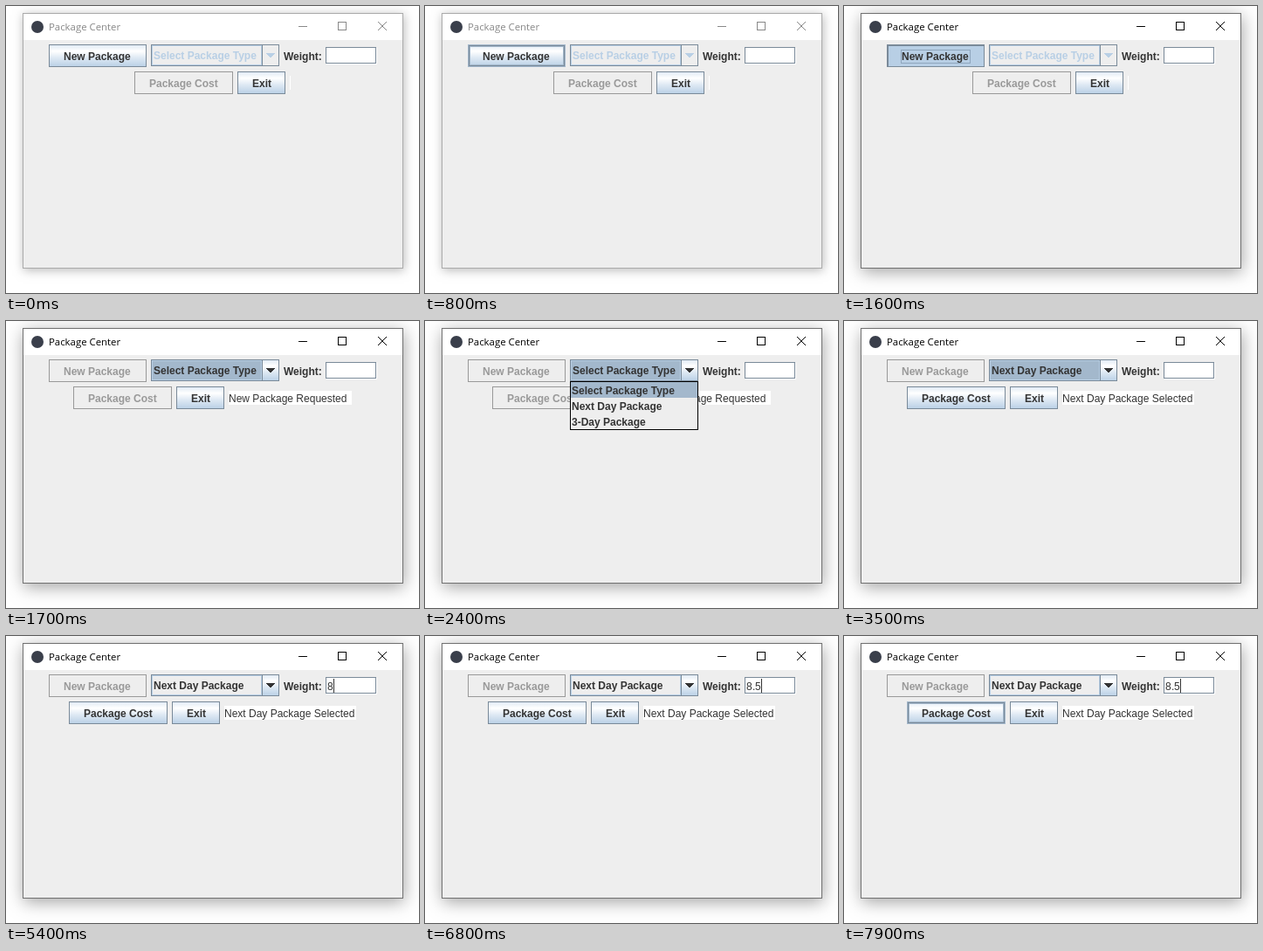
Write an HTML page with a canvas that moves like this. It is 473 by 329 pixels and loops after 8 s.

```html
<!DOCTYPE html>
<html lang="en">
<head>
<meta charset="utf-8">
<title>Package Center</title>
<style>
html, body { margin: 0; width: 100%; height: 100%; overflow: hidden; background: #fff; }
canvas { display: block; }
</style>
</head>
<body>
<canvas id="stage" width="473" height="329"></canvas>
<script>
const ctx = document.getElementById('stage').getContext('2d');
const LOOP = 8000;
const BOLD = 'bold 12px "Liberation Sans", Arial, sans-serif';
const PLAIN = '12px "Liberation Sans", Arial, sans-serif';
const TITLE = '11.4px "Open Sans", "Noto Sans", sans-serif';
const INK = '#333', FACE = '#eee', EDGE = '#7a8a99', SOFT = '#b8cfe5',
      SELECT = '#a3b8cc', DISABLED = '#999';
const TYPES = ['Select Package Type', 'Next Day Package', '3-Day Package'];

// Each step changes only the listed properties.
const STEPS = [
  [0, { active: false, create: 'normal', cost: 'disabled', combo: 'disabled', type: 0,
        popup: -1, rowX: 147, message: '', messageWidth: 1, weight: '', caretX: 0 }],
  [800, { create: 'hover' }],
  [1600, { active: true, create: 'pressed' }],
  [1700, { create: 'disabled', combo: 'focused', rowX: 77,
           message: 'New Package Requested', messageWidth: 141 }],
  [2400, { popup: 0 }],
  [3100, { popup: 1 }],
  [3500, { popup: -1, type: 1, cost: 'normal', rowX: 72,
           message: 'Next Day Package Selected', messageWidth: 151 }],
  [4000, { combo: 'normal', caretX: 368 }],
  [4400, { caretX: 0 }],
  [4900, { caretX: 368 }],
  [5400, { weight: '8', caretX: 375 }],
  [5800, { caretX: 0 }],
  [6300, { caretX: 375 }],
  [6400, { weight: '8.', caretX: 378 }],
  [6800, { weight: '8.5', caretX: 385 }],
  [7300, { caretX: 0 }],
  [7700, { caretX: 385 }],
  [7900, { cost: 'hover' }]
];

function stateAt(time) {
  return Object.assign({}, ...STEPS.filter(([start]) => start <= time).map(step => step[1]));
}

function fill(x, y, w, h, color) {
  ctx.fillStyle = color;
  ctx.fillRect(x, y, w, h);
}

function frame(x, y, w, h, color) {
  ctx.strokeStyle = color;
  ctx.lineWidth = 1;
  ctx.strokeRect(x + 0.5, y + 0.5, w - 1, h - 1);
}

function text(str, x, y, color = INK, font = BOLD) {
  ctx.font = font;
  ctx.fillStyle = color;
  ctx.fillText(str, x, y);
}

function gloss(x, y, w, h) {
  const g = ctx.createLinearGradient(0, y, 0, y + h);
  g.addColorStop(0, '#dde8f3');
  g.addColorStop(0.3, '#fff');
  g.addColorStop(0.6, '#dde8f3');
  g.addColorStop(1, SOFT);
  fill(x, y, w, h, g);
}

function drawWindow(active) {
  fill(0, 0, 473, 329, '#fff');
  ctx.save();
  ctx.shadowColor = active ? 'rgba(0,0,0,.36)' : 'rgba(0,0,0,.28)';
  ctx.shadowBlur = active ? 18 : 11;
  ctx.shadowOffsetX = 1;
  ctx.shadowOffsetY = active ? 4 : 2;
  fill(19, 8, 436, 293, '#fff');
  ctx.restore();
  fill(20, 39, 434, 261, FACE);
  frame(19, 8, 436, 293, active ? '#707070' : '#aaa');

  ctx.fillStyle = '#3a3f4b';
  ctx.beginPath();
  ctx.arc(36, 24, 7, 0, Math.PI * 2);
  ctx.fill();

  const color = active ? '#000' : '#888';
  text('Package Center', 49, 28, color, TITLE);
  fill(335, 23, 10, 1, color);
  frame(380, 18, 10, 10, color);
  ctx.strokeStyle = color;
  ctx.beginPath();
  ctx.moveTo(426, 18);
  ctx.lineTo(436, 28);
  ctx.moveTo(436, 18);
  ctx.lineTo(426, 28);
  ctx.stroke();
}

function drawButton(label, x, y, w, mode) {
  const h = 26;
  if (mode === 'disabled') {
    frame(x, y, w, h, DISABLED);
  } else if (mode === 'pressed') {
    fill(x, y, w, h, SOFT);
    frame(x, y, w, h, EDGE);
    fill(x, y, w, 2, EDGE);
    fill(x, y, 2, h, EDGE);
    frame(x + 16, y + 6, w - 32, 16, '#8fa6bd');
  } else {
    gloss(x, y, w, h);
    frame(x, y, w, h, EDGE);
    if (mode === 'hover') {
      frame(x, y, w, h, SELECT);
      frame(x + 1, y + 1, w - 2, h - 2, EDGE);
      frame(x + 2, y + 2, w - 4, h - 4, SELECT);
    }
  }
  text(label, x + 17, y + 18, mode === 'disabled' ? DISABLED : INK);
}

function drawCombo(label, mode) {
  const off = mode === 'disabled';
  fill(166, 44, 147, 25, FACE);
  if (!off) gloss(293, 44, 20, 25);
  frame(167, 45, 126, 23, SOFT);
  if (mode === 'focused') fill(168, 46, 124, 21, SELECT);
  frame(166, 44, 147, 25, EDGE);
  fill(293, 44, 1, 25, EDGE);
  for (let i = 0; i < 5; i++) fill(298 + i, 54 + i, 10 - 2 * i, 1, off ? SOFT : INK);
  text(label, 169, 61, off ? SOFT : INK);
}

function drawPopup(selected) {
  fill(166, 69, 147, 56, FACE);
  frame(166, 69, 147, 56, '#000');
  TYPES.forEach((label, i) => {
    const y = 70 + 18 * i;
    if (i === selected) fill(167, y, 145, 18, SELECT);
    text(label, 168, y + 14);
  });
}

function drawWeight(value, caretX) {
  text('Weight:', 318, 62);
  fill(367, 48, 58, 19, '#fff');
  frame(366, 47, 58, 19, EDGE);
  const advances = [0, 7, 10];
  [...value].forEach((ch, i) => text(ch, 368 + advances[i], 62, INK, PLAIN));
  if (caretX) fill(caretX, 49, 1, 16, INK);
}

function draw(now) {
  const s = stateAt(now % LOOP);
  drawWindow(s.active);
  drawButton('New Package', 49, 44, 112, s.create);
  drawCombo(TYPES[s.type], s.combo);
  drawWeight(s.weight, s.caretX);
  drawButton('Package Cost', s.rowX, 75, 113, s.cost);
  drawButton('Exit', s.rowX + 118, 75, 55, 'normal');
  fill(s.rowX + 178, 80, s.messageWidth, 16, '#fff');
  text(s.message, s.rowX + 178, 93, INK, PLAIN);
  if (s.popup >= 0) drawPopup(s.popup);
}

const start = performance.now();
function tick() {
  draw(performance.now() - start);
  requestAnimationFrame(tick);
}
tick();
</script>
</body>
</html>
```
